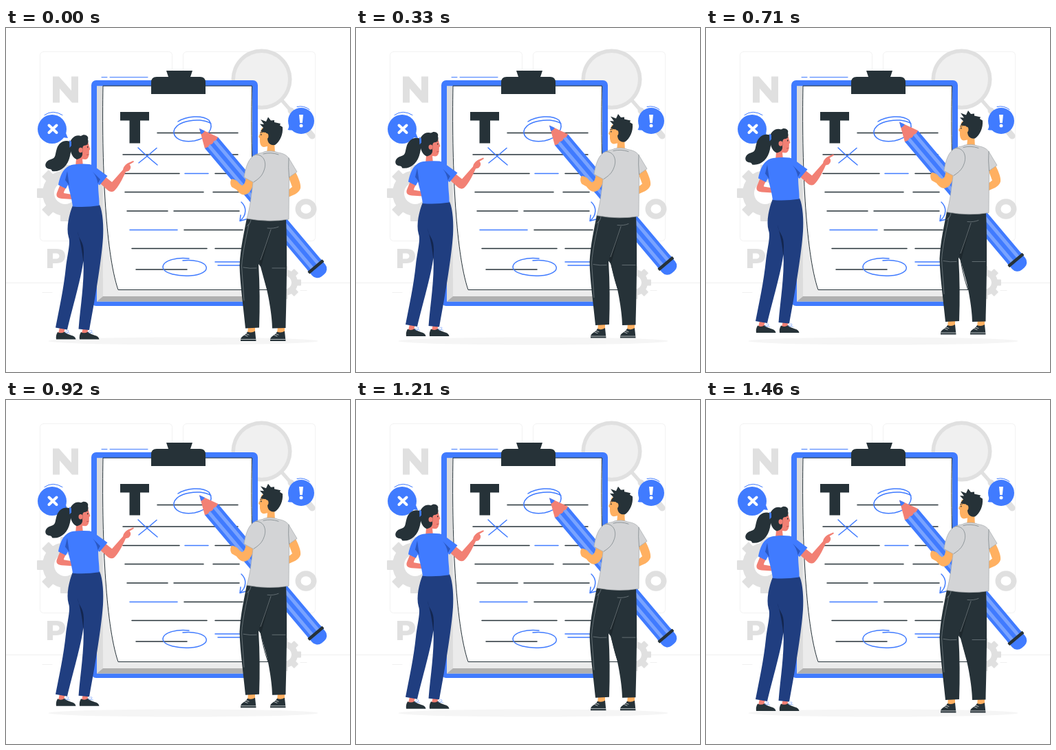
These frames come from a looping animation (500x500 px, 1.5 s). An HTML page with a canvas:

```html
<!DOCTYPE html>
<html lang="en">
<head>
<meta charset="utf-8">
<title>Proofreading</title>
<style>
  html, body { margin: 0; width: 100%; height: 100%; overflow: hidden; background: #fff; }
  canvas { display: block; width: 100vw; height: 100vh; }
</style>
</head>
<body>
<canvas id="stage"></canvas>
<script>
const SIZE = 500, LOOP = 1500, LIFT = 10;
const BLUE = '#407bff', INK = '#263238', GREY = '#e0e0e0', WHITE = '#fff';
const PINK = '#f28074', TAN = '#ffb061', NAVY = '#203e80', NAVY_DARK = '#13264f';
const SHIRT = '#d3d4d6', PALE = '#ebebeb';

const canvas = document.getElementById('stage');
const ctx = canvas.getContext('2d');

function fill(d, color) {
  ctx.fillStyle = color;
  ctx.fill(new Path2D(d), 'evenodd');
}

function stroke(d, color, width = 1) {
  ctx.strokeStyle = color;
  ctx.lineWidth = width;
  ctx.stroke(new Path2D(d));
}

function disc(x, y, rx, color, ry = rx) {
  ctx.fillStyle = color;
  ctx.beginPath();
  ctx.ellipse(x, y, rx, ry, 0, 0, Math.PI * 2);
  ctx.fill();
}

function box(x, y, w, h, r, color) {
  ctx.fillStyle = color;
  ctx.beginPath();
  ctx.roundRect(x, y, w, h, r);
  ctx.fill();
}

function rule(y, x1, x2, color = INK) {
  stroke(`M${x1} ${y}H${x2}`, color, 1.5);
}

function gear(x, y, outer, body, hole, tooth) {
  ctx.save();
  ctx.translate(x, y);
  for (let i = 0; i < 8; i++) {
    box(body - 3, -tooth / 2, outer - body + 3, tooth, 1, GREY);
    ctx.rotate(Math.PI / 4);
  }
  disc(0, 0, body, GREY);
  disc(0, 0, hole, WHITE);
  ctx.restore();
}

function drawBackground() {
  ctx.fillStyle = WHITE;
  ctx.fillRect(0, 0, SIZE, SIZE);
  for (const x of [49.5, 257.5]) {
    ctx.beginPath();
    ctx.roundRect(x, 34.5, 192, 275, 5);
    ctx.strokeStyle = '#f2f2f2';
    ctx.lineWidth = 1;
    ctx.stroke();
  }
  stroke('M0 370.5H500M53 384.5H67M428 381.5H437', '#f0f0f0');
  fill('M68 70.5H77L95 91V70.5H105V108.5H96L78 88V108.5H68Z', GREY);
  fill('M60 321H73C82 321 86 325 86 331.500C86 338 81 342 73 342H68V349H60Z' +
       'M68 327.500V335.500H73C79 335.500 79 327.500 73 327.500Z', GREY);
  ctx.strokeStyle = GREY;
  ctx.lineWidth = 8;
  ctx.beginPath();
  ctx.ellipse(436, 263, 11.5, 10.8, 0, 0, Math.PI * 2);
  ctx.stroke();

  gear(86, 240, 41, 33, 16, 14);
  gear(405, 370, 24, 19, 10, 9);

  stroke('M400 104L414 120', GREY, 5);
  stroke('M414 120L445 157', GREY, 9);
  disc(371.5, 74.5, 44, GREY);
  disc(371.5, 74.5, 38.5, '#f0f0f0');
  disc(257.5, 455, 196, '#f5f5f5', 5.5);
}

function drawBoard() {
  box(124, 76, 242, 328, 7, BLUE);
  ctx.fillStyle = PALE;
  ctx.fillRect(132, 84.5, 226, 313);
  fill('M132 84.500H140L141 390L132 397.500Z', '#dcdcdc');
  fill('M132 397.500L141 390H358V397.500Z', '#b0b0b0');
  const page = 'M141 84.500C139 190 144 325 163 380.500H381C360 325 355 190 357.500 84.500Z';
  fill(page, WHITE);
  stroke(page, INK);
  stroke('M139 71.500H147M151 71.500H206', BLUE);

  fill('M233 62H271L268 71H282Q290 71 290 79V96H211V79Q211 71 219 71H236Z', INK);
  fill('M166 122H208V134.500H195V167.500H179.500V134.500H166Z', INK);

  rule(152.5, 220, 337);
  rule(184, 170, 337);
  rule(211.5, 170, 252);
  rule(211.5, 260, 294, BLUE);
  rule(211.5, 304, 337);
  rule(238.5, 173, 287);
  rule(238.5, 301, 339);
  rule(266, 176, 235);
  rule(266, 244, 339);
  rule(293.5, 180, 249, BLUE);
  rule(293.5, 259, 344);
  rule(320.5, 183, 292);
  rule(320.5, 304, 346);
  rule(351, 189, 263);
  rule(340, 304, 345, BLUE);
  rule(345, 308, 343, BLUE);

  stroke('M250 136C262 128 285 126 295 134C303 145 294 160 274 164C255 167 243 160 244 150C246 139 264 133 282 134Q292 135 298 139', BLUE, 1.5);
  stroke('M266 335C250 333 228 337 228 348C229 357 250 361 268 360C284 359 293 353 291 347C289 340 272 336 257 338', BLUE, 1.5);
  stroke('M192 174Q204 186 220 199M219 174.500Q206 186 193 196', BLUE, 1.5);
  stroke('M342 253C350 260 350 273 340 280M341 272L340 280.500L349 278', BLUE, 1.5);
}

function drawBubbles() {
  disc(67, 147, 21, BLUE);
  fill('M86 148Q87 154 90 160Q83 160 76 157Z', BLUE);
  stroke('M62.500 141.500L73.500 152M73.500 141.500L62.500 152', WHITE, 4);
  stroke('M56 126.500Q68 118 82 126.500', BLUE);

  disc(429, 135, 19, BLUE);
  fill('M411 138Q412 144 409.500 148Q415 149 421 148Z', BLUE);
  fill('M426 126H432L430.800 138H427.200Z', WHITE);
  disc(429, 142, 2.5, WHITE);
  stroke('M423 114.500Q433 112 441 118.500', BLUE);
}

function drawWoman() {
  // shoes and ankles
  for (const dx of [0, 34]) {
    ctx.save();
    ctx.translate(dx, 0);
    fill('M78 435H86L84 444H76Z', PINK);
    fill('M75 442Q80 445 85 441.500C90 447 101 446 101.500 452.500H73Q72 447 75 442Z', INK);
    stroke('M86 443Q88 438 91 440Q92 442 87 443.500Q92 442 93 444', '#8fb2ff', .8);
    ctx.restore();
  }
  // trousers
  fill('M97 258L136 257C141 268 142 290 141 305C139 335 131 385 121 439L105.500 437.500C108 405 114 372 112.500 338C109 365 97 405 89 438.500L72 435.500C77 410 84 378 87 348C90 325 94 312 91 304C87 290 92 270 97 258Z', NAVY);
  fill('M104 296C106 309 113 309 113 326L112.500 342C111 324 108 310 104 296Z', NAVY_DARK);

  // arm on the hip
  fill('M79 227L88 231C85 236 84 238 84 240L96 242L97 249L81 248C73 247 72 243 75 237Z', PINK);
  // pointing arm
  fill('M144 216L154 224L170 206C171 201 174 198 178 196L185 193L186 194.500L179.500 198.500C182 201 182 205 178 208L174 209C169 220 163 232 157 237C154 239 150 238 147 235L137 226Z', PINK);

  // head
  fill('M93 165C84 162 77 167 74 175C71 184 73 189 65 191C57 193 55 201 60 204C64 206 66 204 67 208C79 210 90 201 93 186C95 179 94 172 93 165Z', INK);
  fill('M103 180L107 168L119 165C120.500 170 121 173 122.500 176L120.800 178C121 185 120 191 115 191L111 190.500L112 201H101Z', PINK);
  fill('M93 171C92 161 101 154 109 157C114 153 121 157 119 162C121 168 117 171 113 171C110 173 112 178 111 181C112 187 108 190 103 191C97 189 93 181 93 171Z', INK);
  disc(108.5, 177.5, 3, PINK, 3.7);
  fill('M92 163L95 165L95 171L92.500 174Z', BLUE);
  disc(118.7, 173, .7, INK, 1.2);
  stroke('M116 169.500L119 169', INK, .8);
  stroke('M117.500 184.500L120 184', '#b54f4a', .8);

  // shirt
  fill('M98 198.500Q110 197 121 198C127 199 131 203 135 206L147.500 215L136 228.500L134 227C134 240 136 250 135.500 258Q116 261 97 259.500C95 245 92 237 90 228L87 233.500L76 228C79 213 84 201 98 198.500Z', BLUE);
  fill('M89 208L92 229L86 221Z', '#2b59c4');
  fill('M126 209L137 220L133.500 226Q132 216 126 209Z', '#2b59c4');
}

function drawPencil() {
  ctx.save();
  ctx.translate(281, 146);
  ctx.rotate(Math.atan(1.186));
  box(258, -12.5, 21, 25, [0, 10, 10, 0], BLUE);
  fill('M27 -12.500H262V12.500H27Z', BLUE);
  fill('M27 -8H262V-3H27ZM27 3H262V8H27Z', '#79a3ff');
  fill('M0 0L27 -12.500Q30 -8 27.500 -4Q31 0 27.500 4Q30 8 27 12.500Z', PINK);
  fill('M0 0L8 -3.700Q9 0 8 3.700Z', BLUE);
  box(260.500, -14, 4.500, 28, 1, INK);
  ctx.restore();
}

function drawMan() {
  // shoes and ankles
  for (const dx of [0, 43]) {
    ctx.save();
    ctx.translate(dx, 0);
    fill('M352 434H362V444H351Z', TAN);
    fill('M351 441.500Q357 444 362 440.500L363.500 455H341C340 447 348 448 351 441.500Z', INK);
    stroke('M341 452.500H363M347 446.500L351 448M349 444.500L353 446', '#e4e7e8', .8);
    ctx.restore();
  }
  // trousers
  fill('M350 276L407 277C409 320 408 385 406.500 436L387 436.500C387 420 382 392 379 380L370 347L367 343C369 375 369 405 368 435.500L348 436.500C345 405 340 370 339.500 345C341 318 346 298 350 276Z', INK);
  fill('M368 340L385.500 293L374 335L371 346Z', '#1d272c');
  stroke('M353 285C349 305 344 325 342.500 346L346 396M345 348Q355 350 364 349M387 349H406M380 291Q389 292 396 289M385 293Q378 315 370 337M356 279Q355 285 350 288', '#7d878c', .7);

  // arm behind the hip
  fill('M410 215L420 208C426 219 429 228 428 233C426 240 416 244 409.500 246V236L416 231Z', TAN);
  // writing arm
  fill('M349 215L361 221C359 231 355 242 346 242.500C341 242 338 239 335 235L328 231C325 226 326 220 329 219.500C333 220 336 222 339 226L343 229Q348 228 349 215Z', TAN);

  // head
  fill('M372 145C370 151 369 154 367 158L369 160.500C368.500 167 370 173 375 173L380 172L379 183H391L390 163L384 149Z', TAN);
  fill('M370 150L374 145L369 139.500L375 140L370 133L378 136L381 129.500L385 134.500L390 134L390 137L399 139L398 141.500L402 144C403 155 398 165 391 170C384 171 380 167 380 160L378 152Q374 152 370 150Z', INK);
  disc(378.500, 157, 3, TAN, 4);
  disc(370.8, 155, .7, INK, 1.2);
  stroke('M369.500 152L373 151.500', INK, .9);

  // polo shirt
  const polo = 'M363 184C369 181 373 182 375 180Q386 177 395 181C402 182 407 184 411 189L423 209L411.500 217L411 278Q382 283 350 277C355 261 357 240 359 224L346 217C348 204 352 188 363 184Z';
  fill(polo, SHIRT);
  stroke(polo, '#a6abae', .7);
  stroke('M363 184C376 184 379 197 375 207C372 216 366 220 360 224M411 189Q410 202 411.500 217M374 183Q385 180 396 184', '#737d82', .7);
}

// Linear rise and fall
function liftAt(ms) {
  const phase = (ms % LOOP) / LOOP;
  return -LIFT * (1 - Math.abs(1 - 2 * phase));
}

function resize() {
  const ratio = devicePixelRatio || 1;
  canvas.width = Math.round(innerWidth * ratio);
  canvas.height = Math.round(innerHeight * ratio);
}

function draw(ms) {
  ctx.setTransform(canvas.width / SIZE, 0, 0, canvas.height / SIZE, 0, 0);
  ctx.lineCap = 'round';
  ctx.lineJoin = 'round';
  drawBackground();
  drawBoard();
  drawBubbles();
  ctx.translate(0, liftAt(ms));
  drawWoman();
  drawPencil();
  drawMan();
}

const start = performance.now();
function tick() {
  draw(performance.now() - start);
  requestAnimationFrame(tick);
}

addEventListener('resize', resize);
resize();
tick();
</script>
</body>
</html>
```
